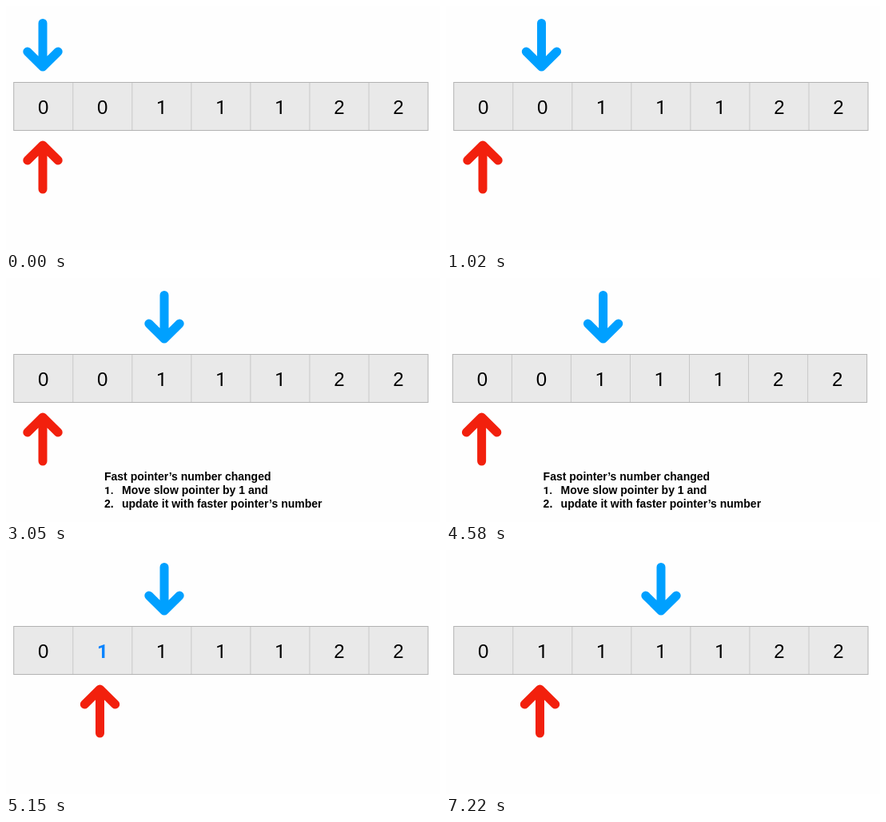
These frames come from a looping animation (543 by 305 pixels, 8 s). An HTML page:

```html
<!DOCTYPE html>
<html lang="en">
<head>
<meta charset="utf-8">
<title>Two pointers</title>
<style>
  html, body { margin: 0; width: 100%; height: 100%; overflow: hidden; background: #fefefe; }
  svg { display: block; width: 543px; height: 305px; }
  .digit { font: 24px "Liberation Sans", Arial, sans-serif; text-anchor: middle; }
  .one { font-family: Roboto, sans-serif; }
  .new { font-weight: 700; fill: #0a84ff; }
  .note { font: 700 14px "Liberation Sans", Arial, sans-serif; }
  .note .one { font-size: 13.5px; }
  .arrow { fill: none; stroke-width: 11; stroke-linecap: round; stroke-linejoin: round; }
</style>
</head>
<body>
<svg id="stage" viewBox="0 0 543 305"></svg>
<script>
const W = 543, LOOP = 8000, STEP = 30;
const LEFT = 9.7, TOP = 95.5, CELL = 74.05, HEIGHT = 60;

// fast and slow: pointer x; fresh: index of a just-written cell
const slides = [
  { cells: '0011122', fast: 46, slow: 46 },
  { cells: '0011122', fast: 119.5, slow: 46 },
  { cells: '0011122', fast: 198, slow: 46, note: true },
  { cells: '0111122', fast: 198, slow: 117.5, fresh: 1 },
  { cells: '0111122', fast: 269, slow: 117.5 }
];

// start and end of the eased push; first visible step and how long it holds
const pushes = [
  { start: 480, end: 1020, first: 500, hold: 30 },
  { start: 2484, end: 3050, first: 2520, hold: 30 },
  { start: 4561, end: 5150, first: 4580, hold: 60 },
  { start: 6660, end: 7220, first: 6680, hold: 30 }
];

const stage = document.getElementById('stage');

function add(parent, tag, attrs, text) {
  const el = document.createElementNS('http://www.w3.org/2000/svg', tag);
  for (const key in attrs) el.setAttribute(key, attrs[key]);
  if (text) el.textContent = text;
  parent.appendChild(el);
  return el;
}

function arrow(g, x, tail, tip, color) {
  const arm = tip + Math.sign(tail - tip) * 19;
  add(g, 'path', {
    class: 'arrow', stroke: color,
    d: `M${x} ${tail}V${tip}M${x - 19.2} ${arm}L${x} ${tip}L${x + 19.2} ${arm}`
  });
}

function note(g) {
  const line = (x, y, text, cls = '') => add(g, 'text', { x, y, class: cls }, text);
  line(123, 253, 'Fast pointer’s number changed');
  line(123, 270, '1.', 'one');
  line(145, 270, 'Move slow pointer by 1 and');
  line(123, 287, '2.');
  line(145, 287, 'update it with faster pointer’s number');
}

function draw(slide) {
  const g = add(stage, 'g', {});
  const box = { x: LEFT, y: TOP, width: CELL * 7, height: HEIGHT };
  add(g, 'rect', { ...box, fill: '#e9e9e9' });
  [...slide.cells].forEach((digit, i) => {
    const x = LEFT + CELL * i;
    if (i) add(g, 'path', { d: `M${x} ${TOP}v${HEIGHT}`, stroke: '#c8c8c8' });
    const cls = 'digit' + (digit === '1' ? ' one' : '') + (slide.fresh === i ? ' new' : '');
    add(g, 'text', { x: x + CELL / 2, y: 134.7, class: cls }, digit);
  });
  add(g, 'rect', { ...box, fill: 'none', stroke: '#b2b2b2' });
  arrow(g, slide.fast, 21.5, 76, '#00a0ff');
  arrow(g, slide.slow, 229, 174, '#f2200d');
  if (slide.note) note(add(g, 'g', { class: 'note' }));
  return g;
}

const groups = slides.map(draw);

function progress(t, p) {
  if (t < p.first) return 0;
  if (t >= p.end) return 1;
  const since = t - p.first;
  const held = since < p.hold ? 0 : Math.floor(since / STEP) * STEP;
  const k = (p.first + held - p.start) / (p.end - p.start);
  return (1 - Math.cos(Math.PI * k)) / 2;
}

function render(t) {
  const pos = pushes.reduce((sum, p) => sum + progress(t, p), 0);
  groups.forEach((g, i) => {
    const offset = i - pos;
    g.setAttribute('visibility', Math.abs(offset) < 1 ? 'visible' : 'hidden');
    g.setAttribute('transform', `translate(${(offset * W).toFixed(2)} 0)`);
  });
}

const begin = performance.now();
function frame() {
  render((performance.now() - begin) % LOOP);
  requestAnimationFrame(frame);
}
frame();
</script>
</body>
</html>
```
